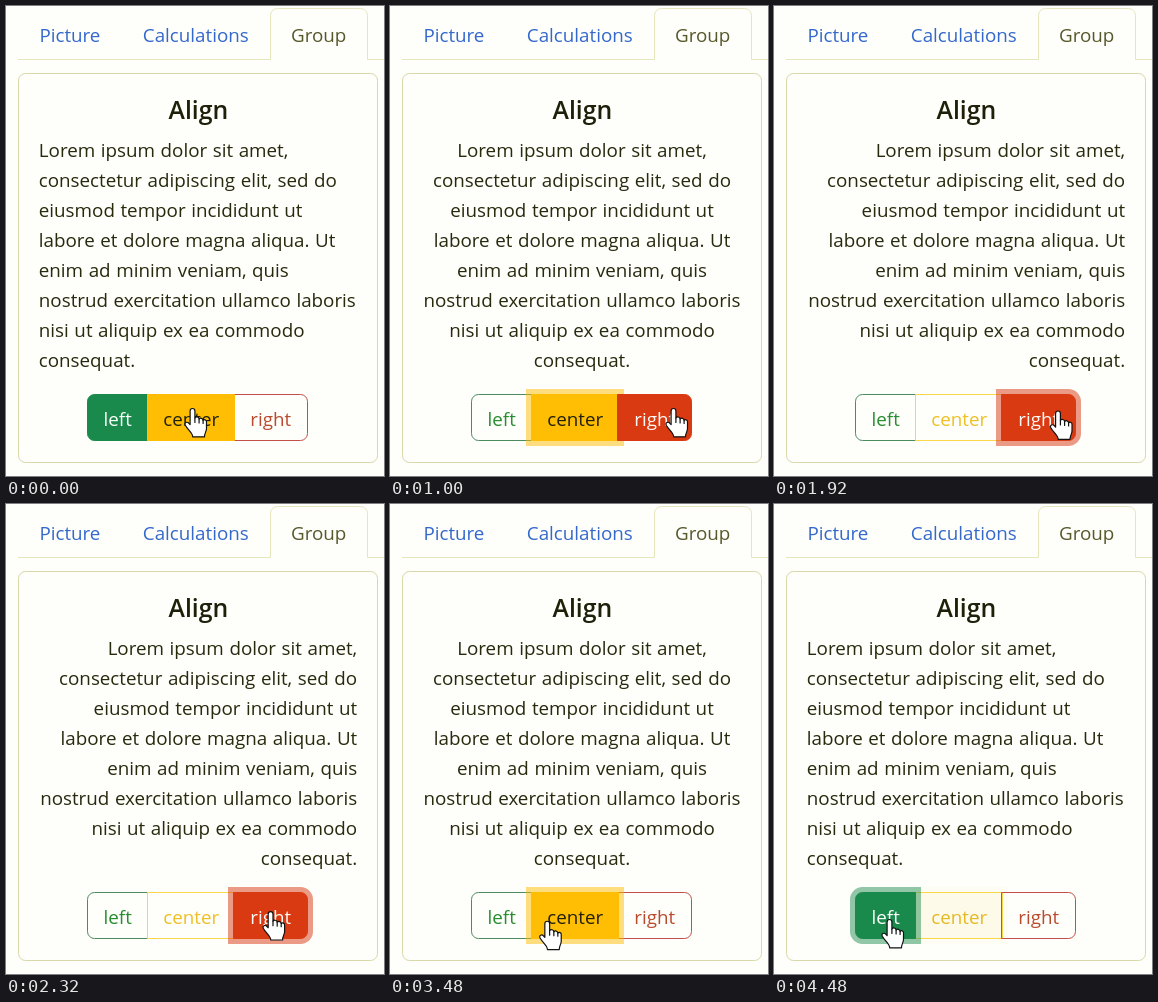
Animation, 378 px wide and 470 px high, one loop 4.52 s. Source, as an HTML page:

```html
<!DOCTYPE html>
<html lang="en">
<head>
<meta charset="utf-8">
<title>Align</title>
<style>
  html, body { margin: 0; width: 100%; height: 100%; overflow: hidden; background: #fefefa; }
  svg { display: block; width: 378px; height: 470px; }
  text { font: 18.8px "Open Sans", "Noto Sans", sans-serif; word-spacing: 0.7px; fill: #282a0e; }
  .link { fill: #3468cc; }
  .tab { fill: #58582c; }
  .title { font-size: 24.8px; font-weight: 600; fill: #1e200a; text-anchor: middle; }
  .label { text-anchor: middle; }
  .line { fill: none; stroke: #e6e6bc; }
  .card { stroke: #d8d8a8; }
</style>
</head>
<body>
<svg viewBox="0 0 378 470">
  <path class="line" d="M12 53.5H264.5V9.5a7 7 0 0 1 7-7H354.5a7 7 0 0 1 7 7V53.5H378"/>
  <text class="link" x="33.4" y="36">Picture</text>
  <text class="link" x="136.8" y="36">Calculations</text>
  <text class="tab" x="285" y="36">Group</text>
  <rect class="line card" x="12.5" y="67.500" width="359" height="389" rx="7"/>
  <text class="title" x="192.4" y="112.500">Align</text>
  <g id="paragraph"></g>
  <g id="buttons"></g>
  <g id="cursor" fill="#fff" stroke="#111" stroke-width="1.2" stroke-linejoin="round" stroke-linecap="round">
    <path d="M-2.4 16V2.4a2.4 2.4 0 0 1 4.8 0V9.5a2.3 2.3 0 0 1 4.2 1a2.3 2.3 0 0 1 4 1.3a2 2 0 0 1 3.4 1.7V20c0 3-2 4.5-2 8.300H.2c0-4-5-7-7.400-11.500c-1.400-2.800 2-4 3.600-2Z"/>
    <path fill="none" d="M2.4 9.5V14M6.6 10.5V14.5M10.6 11.8V15"/>
  </g>
</svg>
<script>
const LOOP = 4520, FADE = 150;
const CLICK_CENTER = 280, CLICK_RIGHT = 1560, CLICK_CENTER_AGAIN = 3020, CLICK_LEFT = 4350;

const lines = [
  "Lorem ipsum dolor sit amet,", "consectetur adipiscing elit, sed do",
  "eiusmod tempor incididunt ut", "labore et dolore magna aliqua. Ut",
  "enim ad minim veniam, quis", "nostrud exercitation ullamco laboris",
  "nisi ut aliquip ex ea commodo", "consequat."
];
const alignments = {
  left: { x: 32.8, anchor: "start" },
  center: { x: 192, anchor: "middle" },
  right: { x: 351.2, anchor: "end" }
};

// Spans of time when a button is filled (checked or hovered) and focused.
const buttons = [
  { name: "left", x1: 81.5, x2: 141.5, roundLeft: 7, roundRight: 0,
    color: [26, 138, 76], border: [74, 140, 96], textColor: [40, 140, 50], filledText: [250, 255, 250],
    filled: [[-LOOP, CLICK_CENTER], [3550, 2 * LOOP]], focused: [[CLICK_LEFT, 2 * LOOP]] },
  { name: "center", x1: 141.5, x2: 228.5, roundLeft: 0, roundRight: 0,
    color: [255, 190, 4], border: [250, 216, 74], textColor: [238, 192, 36], filledText: [34, 32, 8],
    filled: [[-LOOP, CLICK_RIGHT], [2430, CLICK_LEFT]],
    focused: [[CLICK_CENTER, CLICK_RIGHT], [CLICK_CENTER_AGAIN, CLICK_LEFT]] },
  { name: "right", x1: 227.5, x2: 301.5, roundLeft: 0, roundRight: 7,
    color: [217, 58, 18], border: [196, 78, 72], textColor: [186, 74, 46], filledText: [255, 250, 246],
    filled: [[845, CLICK_CENTER_AGAIN]], focused: [[CLICK_RIGHT, CLICK_CENTER_AGAIN]] }
];

// Fingertip positions: time, x, y
const cursorPath = [
  [0, 186.5, 402.5], [720, 187, 402.5], [1000, 283.5, 402.5], [1200, 283.5, 402.5], [1360, 284, 405.5],
  [1800, 284, 405], [2200, 284, 405], [2620, 187.5, 418.5], [3280, 187.5, 418.5],
  [3730, 115.5, 415.5], [LOOP, 115.5, 415.5]
];

const byId = id => document.getElementById(id);
const smooth = p => p * p * (3 - 2 * p);
const clamp = v => Math.min(1, Math.max(0, v));
const mix = (a, b, p) => a + (b - a) * p;
const rgb = (a, b = a, p = 0) => `rgb(${a.map((v, i) => Math.round(mix(v, b[i], p)))})`;
const isIn = (spans, t) => spans.some(([from, to]) => t >= from && t < to);
const fade = (t, start) => smooth(clamp((t - start) / FADE));
const level = (spans, t) => Math.max(0, ...spans.map(([from, to]) => fade(t, from) - fade(t, to)));

function add(parent, tag, attributes, content = "") {
  const node = document.createElementNS("http://www.w3.org/2000/svg", tag);
  for (const key in attributes) node.setAttribute(key, attributes[key]);
  node.textContent = content;
  return parent.appendChild(node);
}

function outline({ x1, x2, roundLeft, roundRight }, grow = 0) {
  const l = roundLeft && roundLeft + grow, r = roundRight && roundRight + grow;
  const left = x1 - grow, right = x2 + grow, top = 388.5 - grow, bottom = 434.5 + grow;
  return `M${left + l} ${top}H${right - r}a${r} ${r} 0 0 1 ${r} ${r}V${bottom - r}` +
    `a${r} ${r} 0 0 1 ${-r} ${r}H${left + l}a${l} ${l} 0 0 1 ${-l} ${-l}V${top + l}a${l} ${l} 0 0 1 ${l} ${-l}Z`;
}

const rows = lines.map((line, i) => add(byId("paragraph"), "text", { y: 151 + 30 * i }, line));

for (const b of buttons) {
  b.group = add(byId("buttons"), "g", {});
  b.ring = add(b.group, "path", { d: outline(b, 5.5), fill: rgb(b.color) });
  b.box = add(b.group, "path", { d: outline(b), fill: rgb(b.color) });
  b.label = add(b.group, "text", { class: "label", x: (b.x1 + b.x2) / 2 + 0.2, y: 419.8 }, b.name);
}

function cursorAt(t) {
  const i = cursorPath.findIndex(point => point[0] > t);
  const [t0, x0, y0] = cursorPath[i - 1], [t1, x1, y1] = cursorPath[i];
  const p = smooth((t - t0) / (t1 - t0));
  return [mix(x0, x1, p), mix(y0, y1, p)];
}

function alignmentAt(t) {
  if (t < CLICK_CENTER || t >= CLICK_LEFT) return alignments.left;
  return t >= CLICK_RIGHT && t < CLICK_CENTER_AGAIN ? alignments.right : alignments.center;
}

function draw(t) {
  const { x, anchor } = alignmentAt(t);
  for (const row of rows) {
    row.setAttribute("x", x);
    row.setAttribute("text-anchor", anchor);
  }
  for (const b of buttons) {
    const fill = level(b.filled, t);
    b.ring.setAttribute("opacity", level(b.focused, t) * 0.5);
    b.box.setAttribute("fill-opacity", fill);
    b.box.setAttribute("stroke", rgb(b.border, b.color, fill));
    b.label.style.fill = rgb(b.textColor, b.filledText, fill);
  }
  // Filled buttons sit above their outlined neighbours.
  [...buttons]
    .sort((a, b) => isIn(a.filled, t) - isIn(b.filled, t))
    .forEach(b => byId("buttons").appendChild(b.group));
  byId("cursor").setAttribute("transform", `translate(${cursorAt(t)})`);
}

const start = performance.now();
function tick() {
  draw((performance.now() - start) % LOOP);
  requestAnimationFrame(tick);
}
tick();
</script>
</body>
</html>
```
